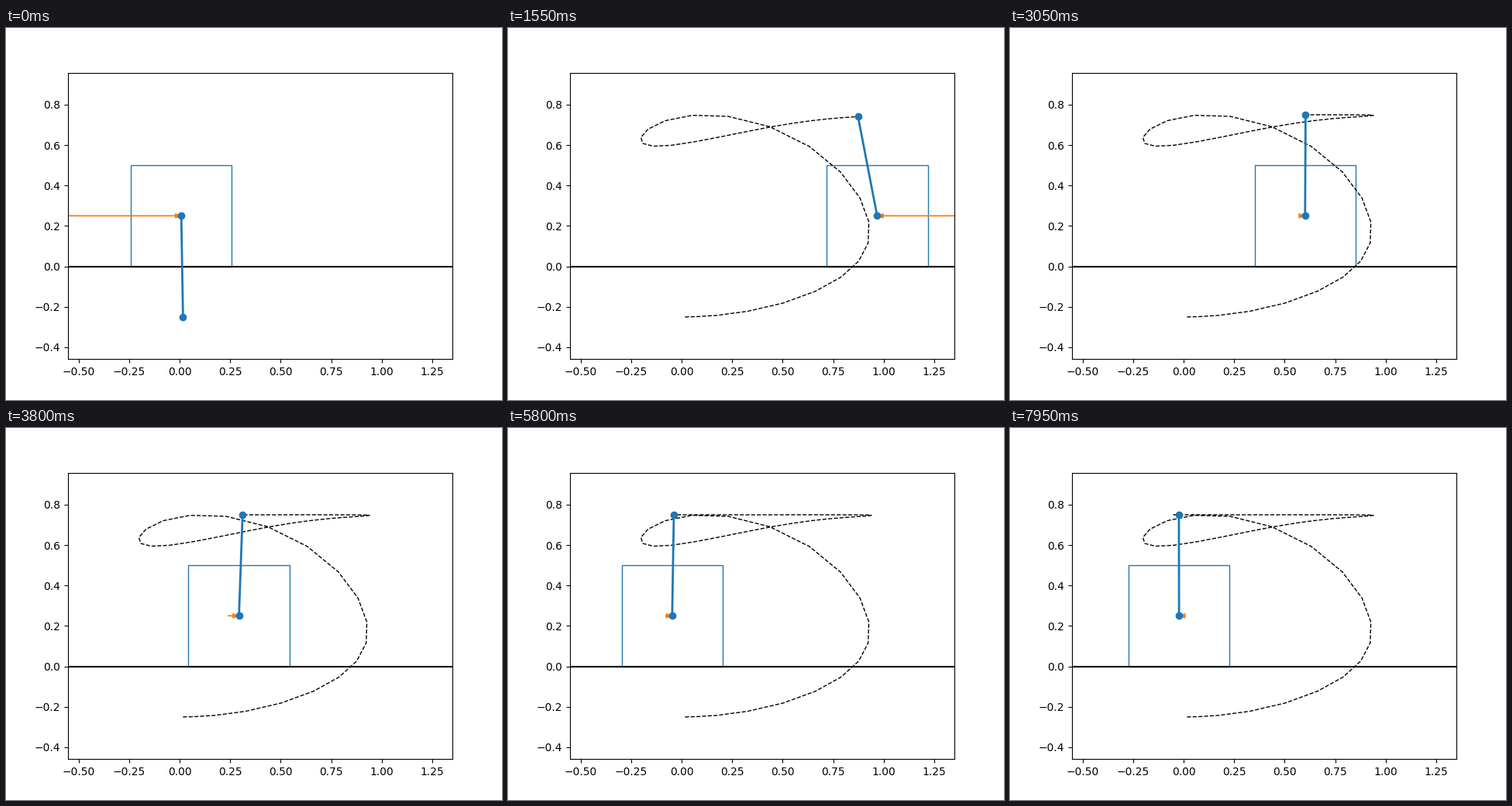
Write a matplotlib script that moves like this. It is 640 px wide and 480 px high and loops after 8 s.

```python
import numpy as np
import matplotlib.pyplot as plt
from matplotlib.animation import FuncAnimation
from matplotlib.patches import Rectangle

FRAMES, INTERVAL = 160, 50
POLE, PIVOT_Y, SIDE = 0.5, 0.25, 0.5
FORCE_SCALE, LEAN_SCALE = 110, 72

# swing-up poses, one every third step, starting at rest one step early
SWING = np.arange(-1, 39, 3)
SWING_X = [0, .087, .329, .441, .335, .142, .091, .222, .509, .754, .906,
           .985, .9927, .9755]
SWING_ANGLE = [0, .18, .73, 1.30, 2.02, 2.965, 3.68, 3.952, 3.811, 3.55,
               3.389, 3.31, 3.252, 3.227]


def settle(k):
    """Cart position while it is brought home: a damped swing."""
    s, u = k - 103.5, k - 51
    swing = -.208 * np.exp(-.04 * s) * np.sin(.03 * s)
    return swing - .889 * np.exp(-.0585 * u - .000014 * u ** 3)


def accel(f, k):
    return f(k + 1) - 2 * f(k) + f(k - 1)


def spline(t, y):
    """Cubic spline through (t, y), flat at its start."""
    h, n = np.diff(t), len(t)
    slope = np.append(0, np.diff(y) / h)
    a, b = np.eye(n), np.zeros(n)
    a[0, :2] = 2 * h[0], h[0]
    b[0] = 6 * slope[1]
    for i in range(1, n - 1):
        a[i, i - 1:i + 2] = h[i - 1], 2 * (h[i - 1] + h[i]), h[i]
        b[i] = 6 * (slope[i + 1] - slope[i])
    m = np.linalg.solve(a, b)

    def curve(k):
        i = np.clip(np.searchsorted(t, k, side="right") - 1, 0, n - 2)
        p, q = t[i + 1] - k, k - t[i]
        return ((m[i] * p ** 3 + m[i + 1] * q ** 3) / (6 * h[i])
                + (y[i] / h[i] - m[i] * h[i] / 6) * p
                + (y[i + 1] / h[i] - m[i + 1] * h[i] / 6) * q)
    return curve


home = np.arange(50., 175, 3)
cart_at = spline(np.append(SWING, home), np.append(SWING_X, settle(home)))

# while balancing, the pole leans in proportion to the cart's acceleration
calm = home[home > 60]
upright = np.pi - LEAN_SCALE * accel(settle, calm)
angle_at = spline(np.append(SWING, calm), np.append(SWING_ANGLE, upright))

steps = np.arange(FRAMES)
cart, angle = cart_at(steps), angle_at(steps)
force = FORCE_SCALE * accel(cart_at, steps)
tip_x = cart + POLE * np.sin(angle)
tip_y = PIVOT_Y - POLE * np.cos(angle)

fig, ax = plt.subplots(figsize=(6.4, 4.8), dpi=100)
ax.set_xlim(-.5519, 1.3491)
ax.set_ylim(-.4583, .9583)

box = ax.add_patch(Rectangle((0, 0), SIDE, SIDE, fill=False, ec="C0", lw=1))
arrow = ax.arrow(0, PIVOT_Y, 1, 0, width=.001, head_width=.02,
                 head_length=.03, length_includes_head=True, color="C1")
ax.axhline(0, color="black", lw=1.5)
trace, = ax.plot([], [], "--", color="black", lw=1)
pole, = ax.plot([], [], "o-", color="C0", lw=2)


def update(k):
    x, f = cart[k], force[k]
    box.set_x(x - SIDE / 2)
    arrow.set_data(x=x - f, y=PIVOT_Y, dx=f, dy=0)
    trace.set_data(tip_x[:k + 1], tip_y[:k + 1])
    pole.set_data([x, tip_x[k]], [PIVOT_Y, tip_y[k]])
    return box, arrow, trace, pole


anim = FuncAnimation(fig, update, frames=FRAMES, interval=INTERVAL,
                     repeat=True, repeat_delay=0)
plt.show()
```
